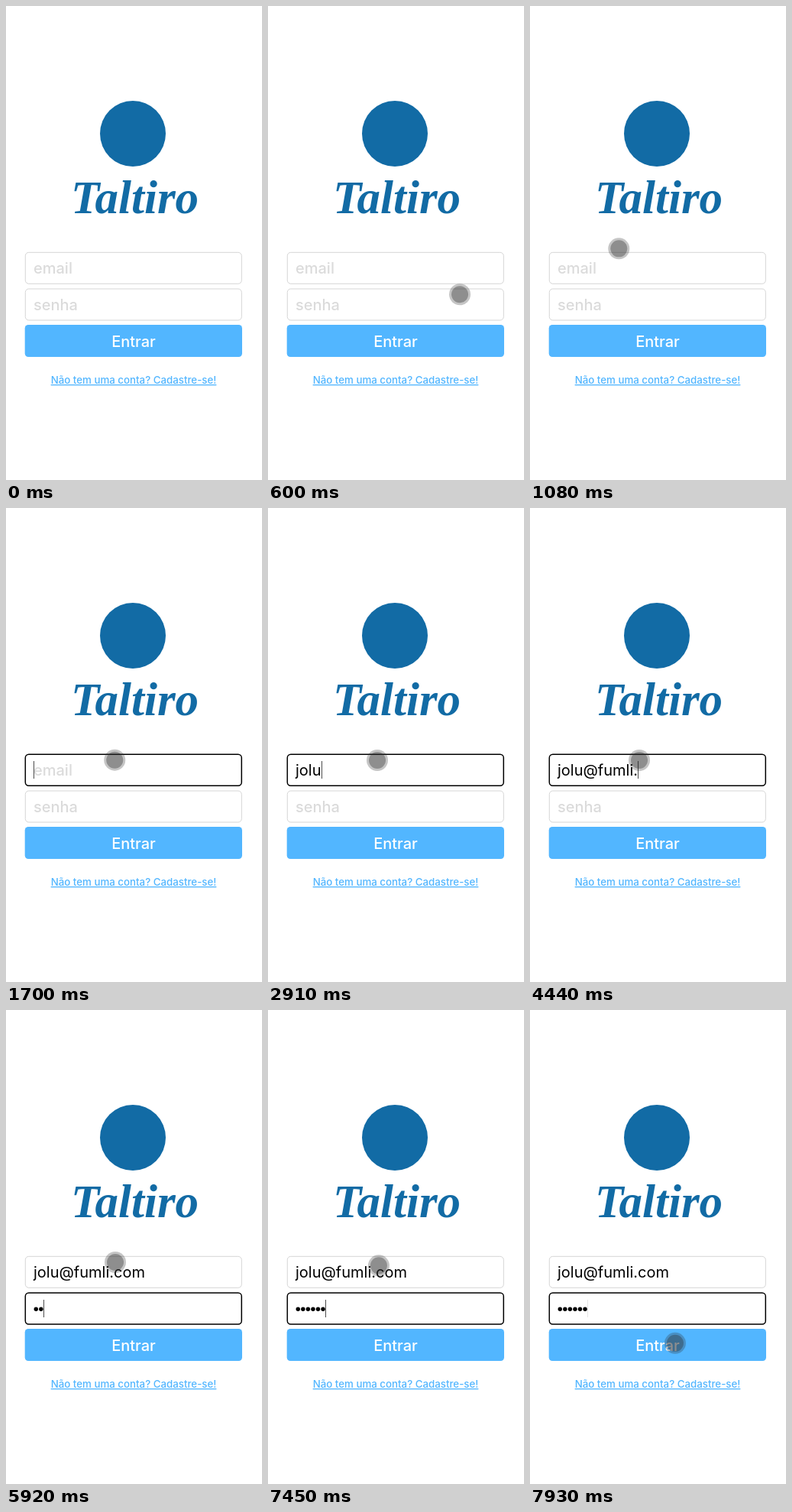
An HTML page for the animation above (8 s loop, 335 by 620 pixels).

```html
<!DOCTYPE html>
<html lang="pt-BR">
<head>
<meta charset="utf-8">
<title>Entrar</title>
<style>
  html, body { margin: 0; width: 100%; height: 100%; overflow: hidden; background: #fff; }
  svg { display: block; width: 100vw; height: 100vh; }
  text { font: 20px Inter, "Open Sans", sans-serif; }
  .brand { font: italic bold 61px "Liberation Serif", serif; fill: #126ba5; }
  .hint { fill: #dbdbdb; font-weight: 500; }
  .enter { font-weight: 500; fill: #fff; }
  .link { font-size: 13.3px; font-weight: 500; fill: #52b6ff; text-decoration: underline; }
  .field { fill: #fff; stroke: #d5d5d5; }
  .field.focus { stroke: #000; stroke-width: 1.5; }
</style>
</head>
<body>
<svg viewBox="0 0 335 620">
  <circle cx="166" cy="167" r="43" fill="#126ba5"/>
  <text class="brand" x="168.5" y="271" text-anchor="middle">Taltiro</text>

  <rect class="field" id="mailBox" x="25.3" y="322.3" width="283" height="41" rx="4.5"/>
  <rect class="field" id="passBox" x="25.3" y="370" width="283" height="41" rx="4.5"/>
  <rect x="24.7" y="417" width="284.3" height="42" rx="4.5" fill="#52b6ff"/>

  <text id="mail" x="36" y="350"></text>
  <text id="pass" class="hint" x="36" y="398">senha</text>
  <g id="dots"></g>
  <text class="enter" x="167" y="446" text-anchor="middle">Entrar</text>
  <text class="link" x="167" y="494" text-anchor="middle">Não tem uma conta? Cadastre-se!</text>
  <rect id="caret" width="1" height="23"/>

  <g id="pointer" fill="#2d2d2d">
    <circle r="14" fill-opacity=".28"/>
    <circle r="11" fill-opacity=".36"/>
  </g>
</svg>
<script>
const LOOP = 8000, FRAME = 67;
const ENTER = 260, FOCUS_MAIL = 1300, FOCUS_PASS = 5040;

// Bursts of typing: text, start, delay between keys
const BURSTS = [
  ["jolu", 2560, 115],
  ["@fum", 3180, 150],
  ["li", 3840, 400],
  [".com", 4440, 90]
];
const DOTS = { count: 6, start: 5520, delay: 345, gap: 6.55 };

// Each glide continues from the end of the one before it
const GLIDES = [
  { from: ENTER, to: 810, path: [[264, 587], [320, 360], [284, 395], [99, 309]] },
  { from: 810, to: 950, path: [[99, 309], [111, 314]] },
  { from: 1011, to: 1150, path: [[111, 314], [122, 321]] },
  { from: 1561, to: 1700, path: [[122, 321], [143, 330]] },
  { from: 7382, to: 7930, path: [[143, 330], [190, 436]], ease: p => p * p * (3 - 2 * p) }
];

const $ = id => document.getElementById(id);
const clamp = (v, max = 1) => Math.max(0, Math.min(max, v));
const set = (el, attrs) => {
  for (const name in attrs) el.setAttribute(name, attrs[name]);
};
const show = (el, on) => { el.style.display = on ? "" : "none"; };
const keysAt = (t, start, delay, count) => clamp(Math.floor((t - start) / delay) + 1, count);

const [mailBox, passBox, mail, pass, dots, caret, pointer] =
  ["mailBox", "passBox", "mail", "pass", "dots", "caret", "pointer"].map($);

for (let i = 0; i < DOTS.count; i++) {
  const dot = document.createElementNS("http://www.w3.org/2000/svg", "circle");
  set(dot, { cx: 39.3 + i * DOTS.gap, cy: 391.3, r: 2.7 });
  dots.appendChild(dot);
}

// De Casteljau: a point on a Bézier curve of any degree
function bezier(points, p) {
  if (points.length === 1) return points[0];
  const next = points.slice(1).map((b, i) => b.map((v, k) => points[i][k] + (v - points[i][k]) * p));
  return bezier(next, p);
}

function pointerAt(t) {
  const { from, to, path, ease = p => p } = GLIDES.filter(g => g.from <= t).pop();
  const held = Math.floor((t - from) / FRAME) * FRAME;
  return bezier(path, ease(clamp(held / (to - from))));
}

function render(t) {
  const onPass = t >= FOCUS_PASS;
  const onMail = t >= FOCUS_MAIL && !onPass;
  const typed = BURSTS.map(([s, start, delay]) => s.slice(0, keysAt(t, start, delay, s.length))).join("");
  const hidden = keysAt(t, DOTS.start, DOTS.delay, DOTS.count);

  mailBox.classList.toggle("focus", onMail);
  passBox.classList.toggle("focus", onPass);

  mail.textContent = typed || "email";
  mail.classList.toggle("hint", !typed);
  show(pass, !hidden);
  [...dots.children].forEach((dot, i) => show(dot, i < hidden));

  const width = onPass ? hidden * DOTS.gap : typed ? mail.getComputedTextLength() : 0;
  show(caret, onMail || onPass);
  set(caret, {
    x: Math.round(36 + width),
    y: onPass ? 379 : 331,
    opacity: 0.7 - 0.6 * clamp((t - 7720) / 210)
  });

  show(pointer, t >= ENTER);
  if (t >= ENTER) set(pointer, { transform: `translate(${pointerAt(t)})` });
}

function tick() {
  render(performance.now() % LOOP);
  requestAnimationFrame(tick);
}
tick();
</script>
</body>
</html>
```
